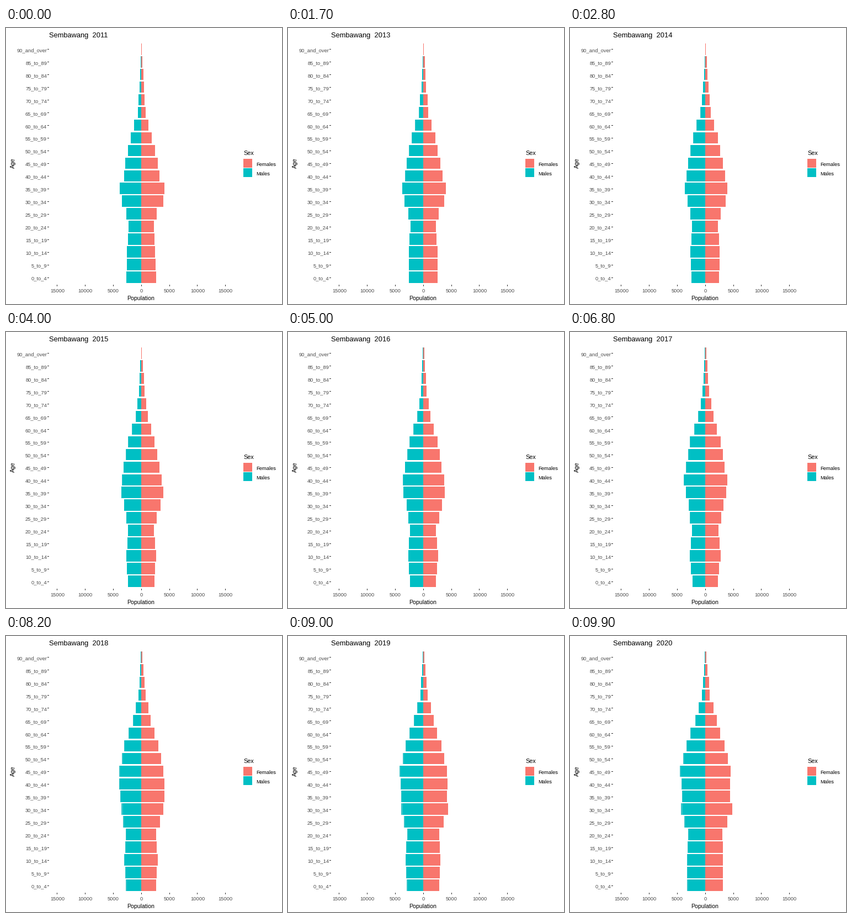
Animation, 500 px wide and 500 px high, one loop 10000 ms. Source, as a matplotlib script:

```python
import numpy as np
import matplotlib.pyplot as plt
from matplotlib.animation import FuncAnimation
from matplotlib.patches import Rectangle

plt.rcParams["font.family"] = "Liberation Sans"

SIZE, DPI = 500, 100
FRAMES, INTERVAL = 100, 100
START, FRAMES_PER_YEAR = 2011, 11

FEMALE, MALE, PALE = "#F8766D", "#00BFC4", "#38C4CA"
DARK, GREY = "#333333", "#4D4D4D"
ZERO, PX_PER_PERSON = 245.3, 0.01016
LEFT, BOTTOM, STEP = 78, 465.8, 22.96

AGES = [f"{a}_to_{a + 4}" for a in range(0, 90, 5)] + ["90_and_over"]
ROWS = np.arange(len(AGES))

# Mean population per sex at a few age rows; the rest is interpolated
KEY_ROWS = [0, 2, 4, 5, 6, 7, 8, 9, 11, 13, 15, 18]
PROFILES = {
    2011: [2660, 2500, 2265, 2700, 3690, 4015, 3150, 2900, 1875, 700, 395, 45],
    2017: [2200, 2740, 2340, 2750, 3000, 3570, 3860, 3380, 2700, 1300, 550, 130],
    2020: [3200, 3225, 3050, 3840, 4580, 4305, 4305, 4530, 3395, 1920, 700, 155],
}
KEY_YEARS = list(PROFILES)
CURVES = np.array([np.interp(ROWS, KEY_ROWS, p) for p in PROFILES.values()])

# Share by which women outnumber the mean
SKEW = np.interp(ROWS, [4, 6, 9, 12, 16], [-0.02, 0.05, 0, 0, 0.2])


def population(year):
    return np.array([np.interp(year, KEY_YEARS, c) for c in CURVES.T])


def row_y(i):
    return BOTTOM - (0.6 + i) * STEP


def label(x, y, s, px, color="black", ha="left", **kw):
    return ax.text(x, y, s, fontsize=px * 72 / DPI, color=color, ha=ha,
                   va="baseline", **kw)


def box(x, y, w, h, color):
    return ax.add_patch(Rectangle((x, y), w, h, facecolor=color,
                                  linewidth=0, snap=False))


def bars(color):
    tops = np.floor(row_y(ROWS) - 0.45 * STEP)
    ends = np.floor(row_y(ROWS) + 0.45 * STEP)
    return [box(ZERO, t, 0, e - t, color) for t, e in zip(tops, ends)]


def span(bar, x0, x1):
    bar.set_x(x0)
    bar.set_width(x1 - x0)


fig = plt.figure(figsize=(SIZE / DPI, SIZE / DPI), dpi=DPI, facecolor="white")
ax = fig.add_axes([0, 0, 1, 1])
ax.set_xlim(0, SIZE)
ax.set_ylim(SIZE, 0)
ax.axis("off")

title = label(LEFT, 17, "", 12.9)
label(244, 493, "Population", 10.5, ha="center")
label(16, 245, "Age", 10.5, ha="center", rotation=90, rotation_mode="anchor")

for i, age in enumerate(AGES):
    y = row_y(i)
    label(74, round(y + 4), age, 9.4, GREY, "right")
    box(LEFT - 3, int(y), 3, 1, DARK)

for value in range(-15000, 15001, 5000):
    x = ZERO + value * PX_PER_PERSON
    label(x, 479, str(abs(value)), 9.4, GREY, "center")
    box(int(x), 465, 1, 3, DARK)

label(430, 230, "Sex", 10.7)
for y, name, color in [(237, "Females", FEMALE), (254, "Males", MALE)]:
    box(430, y, 16, 16, color)
    label(453, y + 13, name, 9.4)

female_bars, male_bars, edge_bars = bars(FEMALE), bars(MALE), bars(PALE)


def update(frame):
    year = START + frame / FRAMES_PER_YEAR
    title.set_text(f"Sembawang  {round(year)}")

    # Half a year of growth shows as a paler edge on the male side
    now, before = population(year), population(year - 0.5)
    right = np.round(ZERO + now * (1 + SKEW) * PX_PER_PERSON)
    left = np.round(ZERO - now * (1 - SKEW) * PX_PER_PERSON)
    edge = np.round(np.maximum(now - before, 0) * PX_PER_PERSON)

    zero = round(ZERO)
    for i in ROWS:
        span(female_bars[i], zero, right[i])
        span(male_bars[i], left[i] + edge[i], zero)
        span(edge_bars[i], left[i], left[i] + edge[i])
    return [title, *female_bars, *male_bars, *edge_bars]


anim = FuncAnimation(fig, update, frames=FRAMES, interval=INTERVAL,
                     repeat=True, repeat_delay=0, blit=False)
plt.show()
```
